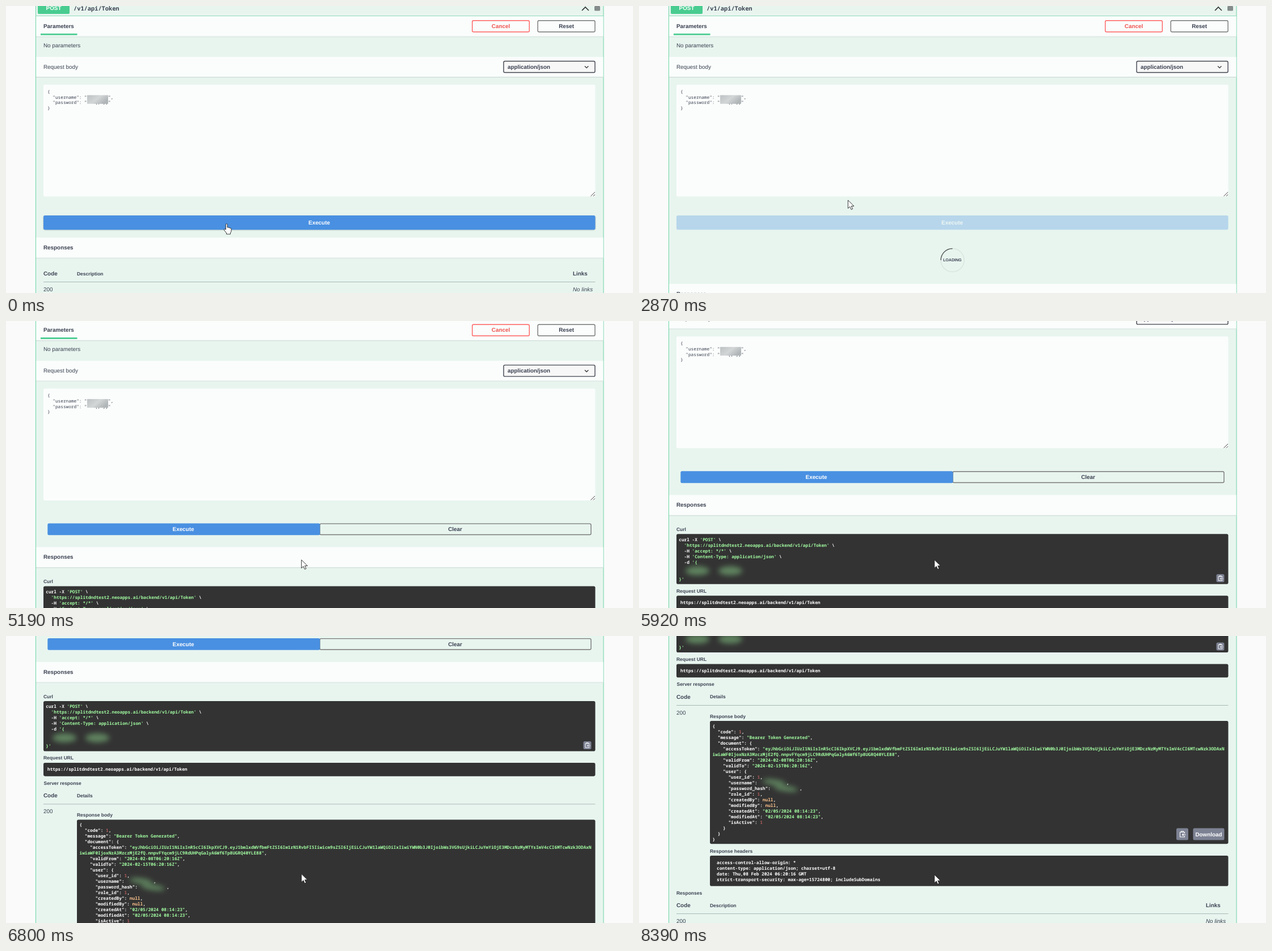
These frames come from a looping animation (1105 by 507 pixels, 8.59 s). An HTML page:

```html
<!DOCTYPE html>
<html lang="en">
<head>
<meta charset="utf-8">
<title>API token request</title>
<style>
  html, body { margin: 0; width: 100%; height: 100%; overflow: hidden; background: #fafafa; }
  svg { display: block; width: 1105px; height: 507px; }
  text { font: 9.87px "Liberation Sans", Arial, sans-serif; fill: #3b4151; white-space: pre; text-rendering: geometricPrecision; }
  .b { font-weight: 700; }
  .s { font-weight: 700; font-size: 8.46px; }
  .i { font-style: italic; }
  .m { font: 700 7.757px "Noto Sans Mono", "DejaVu Sans Mono", monospace; fill: #fff; }
  .t { font-weight: 400; fill: #3b4151; }
  .c { text-anchor: middle; font-weight: 700; }
  .w { fill: #fff; }
</style>
</head>
<body>
<svg id="stage" viewBox="0 0 1105 507"></svg>
<script>
const LOOP = 8590, LOAD_START = 940, LOAD_END = 3400;

const rect = (x, y, w, h, fill, extra = '') =>
  `<rect x="${x}" y="${y}" width="${w}" height="${h}" fill="${fill}" ${extra}/>`;
const path = (d, stroke, width, extra = '') =>
  `<path d="${d}" fill="none" stroke="${stroke}" stroke-width="${width}" ${extra}/>`;
const text = (x, y, str, cls = '') => `<text x="${x}" y="${y}" class="${cls}">${str}</text>`;
const button = (x, y, w, h, stroke, fill = 'none') =>
  rect(x, y, w, h, fill, `stroke="${stroke}" stroke-width="1.4" rx="2.2"`);
const band = (y, h) =>
  rect(53, y + h, 999.5, 1, '#cfdcd7') + rect(53, y + h + 1, 999.5, 1, '#e0ece7') +
  rect(53, y, 999.5, h, '#fafdfc');
const dark = (x, y, h) => rect(x, y, 1038.5 - x, h, '#333', 'rx="2.8"');
const blob = (x, y, rx, ry, turn = 0) =>
  `<ellipse cx="${x}" cy="${y}" rx="${rx}" ry="${ry}" fill="#a2fca2" opacity=".4" filter="url(#blur)" transform="rotate(${turn} ${x} ${y})"/>`;

// Colours quoted values, null and numbers; keys stay white.
const highlight = line => line.replace(/"[^"]*":|"[^"]*"?|^\w[^"]*"|'[^']*'?|^}'|null|\b1\b/g, token => {
  if (token.endsWith('":')) return token;
  const fill = token === 'null' ? '#fcc28c' : token === '1' ? '#b05c5c' : '#a2fca2';
  return `<tspan fill="${fill}">${token}</tspan>`;
});
const code = (x, y, lines) => lines.map((line, i) => text(x, y + i * 10, highlight(line), 'm')).join('');

const clipboard = (x, y, size, scale) =>
  rect(x, y, size, size, '#7d8293', 'rx="2.5"') +
  `<g transform="translate(${x + size / 2} ${y + size / 2}) scale(${scale})">` +
  path('M4 -1V-3.5H-4V5H4V3M-2 -3.5V-5H2V-3.5M6 1H0M2 -1L0 1L2 3', '#fff', 1.1) + '</g>';

const responseTable = y =>
  text(66, y, 'Code', 'b') + text(125, y - .3, 'Description', 's') + text(999, y, 'Links', 'b') +
  rect(66, y + 11, 972.5, 1, '#a9b8b5') +
  text(66, y + 27.5, '200') + text(999, y + 27.5, 'No links', 'i');

const form = rect(52, -10, 1001.5, 1300, '#e8f5ef') +
  rect(52, -10, 1, 1300, '#6fd3a6') + rect(1052.5, -10, 1, 1300, '#6fd3a6') +
  rect(56, -8, 56, 22, '#49cc90', 'rx="2"') + text(84, 7, 'POST', 'c w') +
  `<text x="119" y="8" class="m" style="font-size:10.34px;fill:#3b4151">/v1/api/Token</text>` +
  path('M1015 8L1021 2L1027 8', '#333', 1.6) + rect(1037, 0, 10, 8.5, '#858b8a', 'rx="1.5"') +
  rect(52, 17, 1001, 1, '#8fdcba') +
  band(18, 35.5) + text(66, 39, 'Parameters', 'b') + rect(61, 48.7, 64.5, 2.8, '#49cc90') +
  button(821.7, 25.8, 100.6, 20, '#ff6060') +
  `<text x="872" y="39" class="c" style="fill:#f0524f">Cancel</text>` +
  button(937.2, 25.8, 100.8, 20, '#777') + text(987.6, 39, 'Reset', 'c') +
  text(66, 73, 'No parameters') +
  band(90, 35) + text(66, 110.5, 'Request body') +
  button(877, 97.5, 161, 20, '#41444e', '#f7f7f7') + text(884, 110.5, 'application/json', 'b') +
  path('M1020 106.3L1023.2 109.4L1026.4 106.3', '#333', 1.3) +
  rect(66, 139, 972.5, 197.5, '#fbfdfc', 'rx="2.5"') +
  ['{', '  "username": "        ",', '  "password": "   {, }}"', '}']
    .map((line, i) => text(73, 153.7 + i * 9.8, line, 'm t')).join('') +
  rect(143, 157.5, 37, 15.3, 'url(#cover)') +
  path('M1030.5 336L1038 328.7M1035 336L1038 333', '#444', 1);

const idle = band(409, 35.5) + text(66, 430, 'Responses', 'b') + responseTable(476);

const loader = '<circle cx="552.5" cy="449" r="20.5" fill="none" stroke="#555" stroke-opacity=".1" stroke-width="1.4"/>' +
  path('M538 434.5A20.5 20.5 0 0 1 567 434.5', '#000', 1.4, 'stroke-opacity=".6" id="arc"') +
  '<text x="552.3" y="451.4" class="c" style="font-size:7.05px">LOADING</text>';

const host = 'https://splitdndtest2.neoapps.ai/backend/v1/api/Token';
const result =
  rect(553, 377.7, 478, 19.4, 'none', 'stroke="#777" stroke-width="1.4" rx="2.2"') + text(791.5, 391, 'Clear', 'c') +
  '<g id="rerun">' + rect(73.3, 377, 480, 20.8, '#4990e2', 'rx="2.5"') + text(312.5, 391, 'Execute', 'c w') + '</g>' +
  band(419, 35.5) + text(66, 440, 'Responses', 'b') +
  text(66, 483, 'Curl', 's') + dark(66, 488, 88.5) +
  code(70.3, 500.3, ["curl -X 'POST' \\", `  '${host}' \\`, "  -H 'accept: */*' \\",
    "  -H 'Content-Type: application/json' \\", "  -d '{", '', '', "}'"]) +
  blob(103, 553, 21, 8) + blob(161, 553, 21, 8) + clipboard(1017.5, 559, 14, .85) +
  text(66, 591.5, 'Request URL', 's') + dark(66, 597, 23.7) + code(73, 611.4, [host]) +
  text(66.5, 635.6, 'Server response', 's') +
  text(66, 658, 'Code', 'b') + text(125, 657.6, 'Details', 's') + rect(66, 669.5, 972.5, 1, '#a9b8b5') +
  text(66, 686, '200') + text(125, 692, 'Response body', 's') + dark(125, 697.5, 217.3) +
  code(129.5, 709.3, ['{', '  "code": 1,', '  "message": "Bearer Token Generated",', '  "document": {',
    '    "accessToken": "eyJhbGciOiJIUzI1NiIsInR5cCI6IkpXVCJ9.eyJ1bmlxdWVfbmFtZSI6Im1rN1RvbFI5Iiwicm9sZSI6IjEiLCJuYW1laWQiOiIxIiwiYWN0b3J0IjoibWs3VG9sUjkiLCJuYmYiOjE3MDczNzMyMTYsImV4cCI6MTcwNzk3ODAxN',
    'iwiaWF0IjoxNzA3MzczMjE2fQ.nnpvFYqcm9jLC9RdUHPqGalyA6Wf6Tp8UGRQ40YLE88",',
    '    "validFrom": "2024-02-08T06:20:16Z",', '    "validTo": "2024-02-15T06:20:16Z",', '    "user": {',
    '      "user_id": 1,', '      "username":           ,', '      "password_hash":           ,', '      "role_id": 1,',
    '      "createdBy": null,', '      "modifiedBy": null,', '      "createdAt": "02/05/2024 08:14:23",',
    '      "modifiedAt": "02/05/2024 08:14:23",', '      "isActive": 1', '    }', '  }', '}']) +
  blob(238, 806, 20, 5, 8) + blob(259, 817, 21, 5, 8) +
  clipboard(947, 887, 21, 1) + rect(976.5, 887, 55, 21, '#7d8293', 'rx="2.5"') + text(1004, 901, 'Download', 'c w') +
  text(125, 930, 'Response headers', 's') + dark(125, 935.5, 53.7) +
  code(137, 950.3, ['access-control-allow-origin: *', 'content-type: application/json; charset=utf-8',
    'date: Thu,08 Feb 2024 06:20:16 GMT', 'strict-transport-security: max-age=15724800; includeSubDomains']) +
  text(66, 1004, 'Responses', 's') + responseTable(1026.6);

document.getElementById('stage').innerHTML = `
  <defs>
    <filter id="blur" x="-100%" y="-150%" width="300%" height="400%"><feGaussianBlur stdDeviation="5"/></filter>
    <filter id="glow" x="-5%" y="-50%" width="110%" height="200%"><feGaussianBlur stdDeviation="1.3"/></filter>
    <linearGradient id="cover" x2="1" y2=".5"><stop stop-color="#bcc1c3"/><stop offset=".55" stop-color="#d3d6d7"/><stop offset="1" stop-color="#b0b5b7"/></linearGradient>
  </defs>
  <g id="page">${form}
    <g id="idle">${idle}</g>
    <g id="execute">${rect(66, 371, 972.5, 24.5, '#000', 'rx="3" filter="url(#glow)" id="shadow"')}
      ${rect(66, 370, 972.5, 25.3, '#4990e2', 'rx="2.8"')}${text(552, 386.2, 'Execute', 'c w')}</g>
    <g id="loader">${loader}</g>
    <g id="result">${result}</g>
  </g>
  <g id="cursor" fill="#fff" stroke="#222" stroke-width=".9" stroke-linejoin="round">
    <path id="arrow" d="M0 0V14.5L3.4 11.4L5.8 16.6L8.2 15.5L5.9 10.5H10.6Z"/>
    <path id="hand" d="M-1.4 10V1.2a1.4 1.4 0 0 1 2.8 0V6.2l1.4-.3 1 .8 1.4-.2 1 .9 1.5.2.6 1V13l-1.5 3v2H-.2v-2L-3.4 12-4.6 9.8l1-1z"/>
  </g>`;

const el = Object.fromEntries([...document.querySelectorAll('g[id], path[id], rect[id]')].map(n => [n.id, n]));
const clamp = v => Math.max(0, Math.min(1, v));
const show = (node, on) => node.setAttribute('display', on ? 'inline' : 'none');
const move = (node, x, y) => node.setAttribute('transform', `translate(${x} ${y})`);

// Wheel notches: start time and scroll position reached after four steps.
const notches = [[5120, 49], [5520, 98], [5920, 234.6], [6324, 313], [6660, 391], [7060, 469], [7530, 547.5]];
const notchEase = [.1, .4, .77, 1];
function scrollAt(t) {
  let y = 0;
  for (const [start, end] of notches) {
    if (t < start) break;
    y += (end - y) * notchEase[Math.min(3, Math.floor((t - start) / 66))];
  }
  return y;
}

// Pointer tip as time, x, y; equal times make a jump.
const pointer = [[0, 388.7, 385], [70, 388.7, 385], [260, 387, 390], [400, 384, 387], [740, 368.3, 343],
  [3610, 368.3, 343], [3610, 368.3, 341.7], [5120, 368.3, 341.7], [5120, 520.7, 422], [5920, 520.7, 422],
  [6390, 520.7, 421], [7200, 520.7, 419.7], [7870, 520.7, 420.5], [8390, 520.7, 420.5], [8390, 520.7, 421.7], [LOOP, 520.7, 421.7]];
function pointerAt(t) {
  const i = pointer.findIndex(p => p[0] > t);
  const [t0, x0, y0] = pointer[i - 1], [t1, x1, y1] = pointer[i];
  const k = (t - t0) / (t1 - t0);
  return [x0 + (x1 - x0) * k, y0 + (y1 - y0) * k];
}

function draw(t) {
  const loading = t >= LOAD_START && t < LOAD_END, done = t >= LOAD_END;
  const [x, y] = pointerAt(t);
  const hover = y > 370 && y < 395 && t < LOAD_START;

  move(el.page, 0, -scrollAt(t));
  show(el.idle, !done);
  show(el.execute, !done);
  show(el.loader, loading);
  show(el.result, done);
  move(el.idle, 0, loading ? 82 : 0);
  el.execute.setAttribute('opacity', loading ? 1 - .7 * clamp((t - LOAD_START) / 300) : 1);
  el.shadow.setAttribute('opacity', loading ? 0 : hover ? .3 : .15);
  el.rerun.setAttribute('opacity', .3 + .7 * clamp((t - LOAD_END) / 210));

  const step = Math.floor((t - LOAD_START) / 68);
  el.loader.setAttribute('opacity', clamp((t - LOAD_START + 70) / 500));
  el.arc.setAttribute('transform', `rotate(${258.5 + (step - 11) * 24.5} 552.5 449)`);

  move(el.cursor, x, y);
  show(el.hand, hover);
  show(el.arrow, !hover);
}

function tick() {
  draw(performance.now() % LOOP);
  requestAnimationFrame(tick);
}
tick();
</script>
</body>
</html>
```
